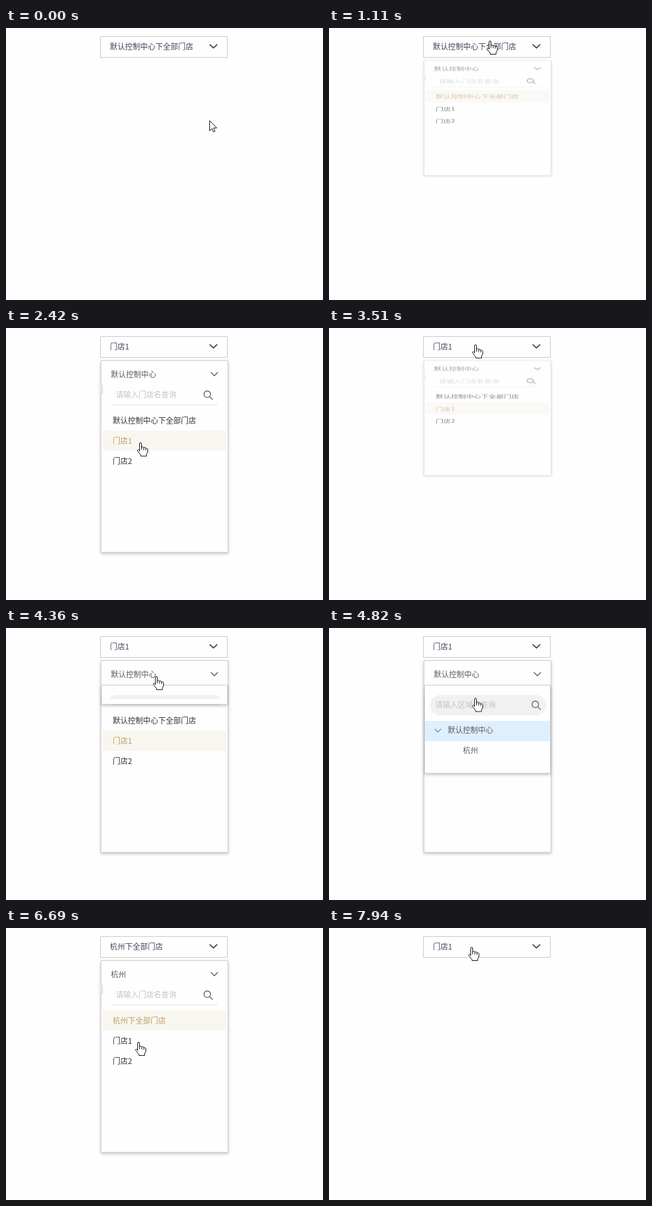
These frames come from a looping animation (502 px wide and 430 px high, 8 s). An HTML page:

```html
<!DOCTYPE html>
<html lang="zh-CN">
<head>
<meta charset="utf-8">
<title>门店选择</title>
<style>
html, body { margin: 0; width: 100%; height: 100%; overflow: hidden; background: #fefefe; }
svg { display: block; width: 502px; height: 430px; }
text { font: 12px "Noto Sans CJK SC", "Noto Sans CJK", "Noto Sans", sans-serif; fill: #333; }

/* Every track shares one 8 s clock and holds its value between keys. */
.anim { animation: 8s step-end infinite; }

.label text { fill: #42445a; }
.head { fill: #5c5c62; }
.hint { fill: #c3c3c3; }
.icon { fill: none; stroke: #5a5a62; stroke-width: 1.3; }
.sheet { fill: #fefefe; stroke: #cdcdd8; filter: drop-shadow(0 2px 2.5px rgba(0, 0, 0, .24)); }
.menu .sheet { stroke: #d8d3c6; }

/* Texts shown for one state of the selection */
.home-label { animation-name: home-label; }
.shop-label { animation-name: shop-label; }
.city-label { animation-name: city-label; }
.before { animation-name: before; }
.after { animation-name: after; }
@keyframes home-label { 0% { opacity: 1 } 30.25%, 100% { opacity: 0 } }
@keyframes shop-label { 0%, 68.75% { opacity: 0 } 30.25%, 86.375%, 100% { opacity: 1 } }
@keyframes city-label { 0%, 86.375%, 100% { opacity: 0 } 68.75% { opacity: 1 } }
@keyframes before { 0% { opacity: 1 } 68.75%, 100% { opacity: 0 } }
@keyframes after { 0% { opacity: 0 } 68.75%, 100% { opacity: 1 } }

/* Highlight moves between the first two rows */
.bar { fill: #f9f6f0; animation-name: bar; }
.row1 { animation-name: row1; }
.row2 { animation-name: row2; }
@keyframes bar { 0%, 68.75% { transform: none } 30.25%, 86.375%, 100% { transform: translateY(32px) } }
@keyframes row1 { 0%, 68.75% { fill: #bd9c62 } 30.25%, 86.375%, 100% { fill: #333 } }
@keyframes row2 { 0%, 68.75% { fill: #333 } 30.25%, 86.375%, 100% { fill: #bd9c62 } }

.line { stroke: #e2e2e6; animation-name: line; }
@keyframes line {
  0%, 25.4%, 81.6%, 100% { stroke: #e2e2e6 }
  23.45%, 77.6% { stroke: #c0c4cc }
}

/* Panel: unrolls from its top edge, fades out at full size */
.panel { transform-origin: 0 51px; animation-name: panel; }
@keyframes panel {
  0%, 36.125%, 92.375%, 100% { opacity: 0; transform: none }
  13.875%, 43.875% { opacity: .6; transform: scaleY(.6) }
  14.875%, 44.875% { opacity: .9; transform: scaleY(.9) }
  15.875%, 45.875% { opacity: .98; transform: scaleY(.98) }
  16.75%, 46.75% { opacity: 1; transform: scaleY(.995) }
  17.625%, 47.625% { opacity: 1; transform: none }
  32.125%, 88.25% { opacity: .45; transform: none }
  33.125%, 89.25% { opacity: .12; transform: none }
  34.125%, 90.25% { opacity: .03; transform: none }
  35.125%, 91.25% { opacity: .01; transform: none }
}

/* Region menu: slides open by height */
.slide { animation-name: slide; }
@keyframes slide {
  0%, 71.875%, 100% { height: 0 }
  54.5% { height: 30px }
  55.5% { height: 92px }
  56.4% { height: 128px }
  57.375% { height: 139px }
  71.125% { height: 60px }
}
.hover { fill: #e8f2fe; animation-name: hover; }
@keyframes hover { 0%, 100% { opacity: 0 } 64.25%, 74% { opacity: 1 } }

/* Pointer */
.pointer { animation-name: move; fill: #fff; stroke: #111; stroke-linejoin: round; }
.arrow { animation-name: arrow; }
.hand { animation-name: hand; }
@keyframes arrow { 0%, 35.125%, 91.25% { opacity: 1 } 4.075%, 41%, 99.25%, 100% { opacity: 0 } }
@keyframes hand { 0%, 35.125%, 91.25% { opacity: 0 } 4.075%, 41%, 99.25%, 100% { opacity: 1 } }
@keyframes move {
  0% { transform: translate(322px, 146px) }
  .875% { transform: translate(322px, 146px); animation-timing-function: steps(5, jump-both) }
  4.875% { transform: translate(254px, 18px) }
  8% { transform: translate(254px, 18px); animation-timing-function: steps(1, jump-both) }
  8.75% { transform: translate(255px, 20px) }
  20.5% { transform: translate(255px, 20px); animation-timing-function: steps(7, jump-both) }
  27.375% { transform: translate(213px, 181px) }
  35.875% { transform: translate(213px, 181px); animation-timing-function: steps(5, jump-both) }
  41% { transform: translate(232px, 26px) }
  45.875% { transform: translate(232px, 26px); animation-timing-function: steps(3, jump-both) }
  48.75% { transform: translate(238px, 85px) }
  51.5% { transform: translate(238px, 85px); animation-timing-function: steps(1, jump-both) }
  52.5% { transform: translate(238px, 76px) }
  59.25% { transform: translate(238px, 76px); animation-timing-function: steps(6, jump-both) }
  65.25% { transform: translate(217px, 197px) }
  74.625% { transform: translate(217px, 197px); animation-timing-function: steps(4, jump-both) }
  78.625% { transform: translate(222px, 113px) }
  79.625% { transform: translate(222px, 113px); animation-timing-function: steps(4, jump-both) }
  83.625% { transform: translate(210px, 180px) }
  90.375% { transform: translate(210px, 180px); animation-timing-function: steps(2, jump-both) }
  92.375% { transform: translate(209px, 198px) }
  94.25% { transform: translate(209px, 198px); animation-timing-function: steps(5, jump-both) }
  99.25%, 100% { transform: translate(226px, 30px) }
}
</style>
</head>
<body>
<svg viewBox="0 0 502 430">
  <defs>
    <path id="lens" d="M5.2 0A5.2 5.2 0 1 1 -5.2 0A5.2 5.2 0 1 1 5.2 0M3.7 3.7L8.6 8.6"/>
    <clipPath id="menu-clip"><rect class="anim slide" x="151" y="82" width="200" height="0"/></clipPath>
  </defs>

  <g class="label">
    <rect x="149.5" y="13.5" width="201" height="33" fill="#fefefe" stroke="#c9c9c9"/>
    <text class="anim home-label" x="164.5" y="34">默认控制中心下全部门店</text>
    <text class="anim shop-label" x="164.5" y="34">门店1</text>
    <text class="anim city-label" x="164.5" y="34">杭州下全部门店</text>
    <path class="icon" d="M322.5 26l6 5.5 6-5.5" style="stroke: #434d55; stroke-width: 1.7"/>
  </g>

  <g class="anim panel">
    <rect class="sheet" x="150.5" y="51.5" width="201" height="303"/>
    <rect x="150" y="90" width="3.5" height="14" fill="#e4e2de"/>
    <text class="head anim before" x="166" y="78">默认控制中心</text>
    <text class="head anim after" x="166" y="78">杭州</text>
    <path class="icon" d="M324.5 70l5.5 5.5 5.5-5.5"/>

    <text class="hint" x="174" y="110">请输入门店名查询</text>
    <use class="icon" href="#lens" x="318.7" y="104.7"/>
    <path class="anim line" d="M166 121.5H336"/>

    <rect class="anim bar" x="153" y="130" width="196" height="32"/>
    <g class="anim row1">
      <text class="anim before" x="169" y="151" style="fill: inherit">默认控制中心下全部门店</text>
      <text class="anim after" x="169" y="151" style="fill: inherit">杭州下全部门店</text>
    </g>
    <text class="anim row2" x="169" y="183">门店1</text>
    <text x="169" y="215">门店2</text>

    <g class="menu">
      <rect class="sheet anim slide" x="151.5" y="90.5" width="199" height="0"/>
      <g clip-path="url(#menu-clip)">
        <rect x="160" y="106" width="184" height="32" rx="16" fill="#f1f1f1"/>
        <text class="hint" x="168" y="126">请输入区域名查询</text>
        <use class="icon" href="#lens" x="326.7" y="120.7"/>
        <rect x="152" y="147" width="198" height="32" fill="#e0effe"/>
        <rect class="anim hover" x="152" y="179" width="198" height="32"/>
        <path class="icon" d="M167.5 159.5l5 5 5-5" style="stroke: #5b93c4"/>
        <text class="head" x="188" y="166">默认控制中心</text>
        <text class="head" x="212" y="198">杭州</text>
      </g>
    </g>
  </g>

  <g class="anim pointer">
    <path class="anim arrow" d="M.5 .5V16.5L4.2 13L6.5 18.3L9 17.2L6.7 12H11.8Z"/>
    <path class="anim hand" d="M-1.5 14V2Q-1.5 .5 0 .5T1.5 2V8Q2 6.5 3.5 6.8Q5 7 5 8.5Q5.5 7.5 7 7.8Q8.3 8 8.3 9.5Q9 8.8 10.3 9.3Q11.5 9.8 11.5 11V15L9.5 19V21.5H.5V20L-4.5 13.5Q-5 11.5 -3.5 11.3Q-2.5 11.5 -1.5 13ZM1.5 8V11.5M5 8.5V12M8.3 9.5V12.5"/>
  </g>
</svg>
</body>
</html>
```
